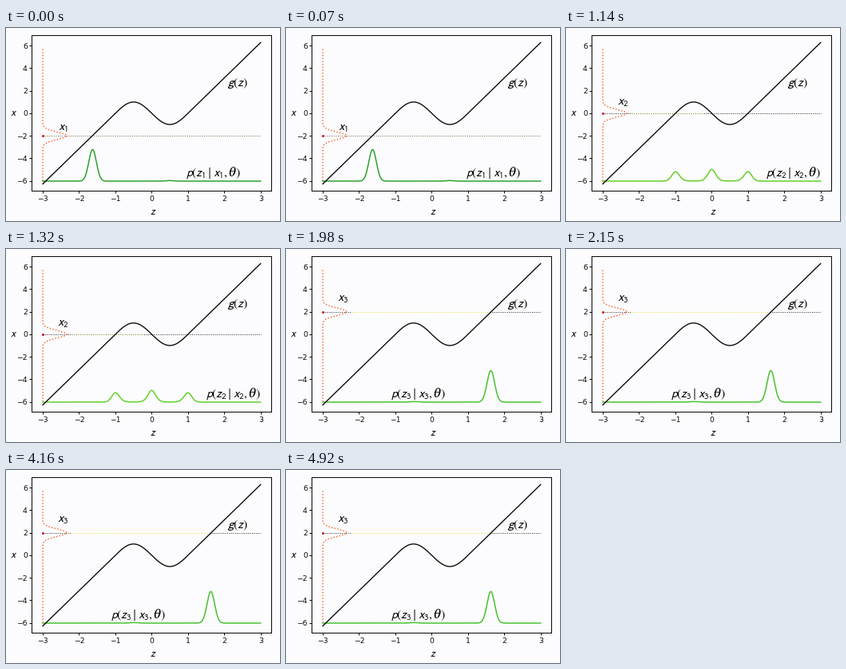
A matplotlib script for the animation above (5680 ms loop, 343 px wide and 242 px high).

```python
import numpy as np
import matplotlib.pyplot as plt
from matplotlib.animation import FuncAnimation

W, H, DPI = 343, 242, 72
LOOP, STEP = 5680, 20
INK, PAPER = "#080808", "#fcfcfe"
NOISE = 0.33              # std of x given z
PRIOR = 1.5               # std of z
BASE, GAIN = -6.03, 0.75  # placement of the posterior curve

plt.rcParams.update({
    "font.family": "DejaVu Sans",
    "mathtext.fontset": "stixsans",
    "axes.linewidth": 1,
    "axes.edgecolor": INK,
    "lines.dash_capstyle": "butt",
})

# start (ms), observed x, x label baseline, posterior label centre,
# posterior colour, guide colour and the z range where the guide has it
SCENES = [
    (0, -2, 128.5, 260, "#2ca02c", "#6e6a4c", (-3, 3)),
    (1140, 0, 97, 285, "#62cf26", "#857a10", (-2.2, -0.2)),
    (1980, 2, 65.5, 165.5, "#46c22e", "#ece22a", (-2.2, 1.6)),
]


def g(z):
    return np.where(np.abs(z) < 1, -np.sin(np.pi * z),
                    np.pi * (z - np.sign(z)))


def bell(u, std):
    return np.exp(-0.5 * (u / std) ** 2)


def posterior(z, x):
    p = bell(x - g(z), NOISE) * bell(z, PRIOR)
    return p / (p.sum() * (z[1] - z[0]))


def label(x, y, text, size=15.5, **kw):
    """Text placed in stage pixels, measured from the top left."""
    kw = {"ha": "center", "va": "baseline", "color": INK, **kw}
    return fig.text(x / W, 1 - y / H, text, fontsize=size, **kw)


fig = plt.figure(figsize=(W / DPI, H / DPI), dpi=DPI, facecolor=PAPER)
ax = fig.add_axes([32.4 / W, 1 - 204.4 / H, 300 / W, 195 / H],
                  facecolor=PAPER)
ax.set(xlim=(-3.3, 3.3), ylim=(-6.91, 6.91),
       xticks=range(-3, 4), yticks=range(-6, 7, 2))
ax.tick_params(labelsize=9.2, length=3, width=1, pad=2.6,
               color=INK, labelcolor=INK)

z = np.linspace(-3, 3, 601)
xs = np.linspace(-6, 5.85, 400)

guide, = ax.plot([], [], color=INK, lw=0.9, ls=":")
tint, = ax.plot([], [], lw=1, ls=":")
likelihood, = ax.plot([], [], color="#fa5a1e", lw=1.4, ls=":")
density, = ax.plot([], [], lw=1.5)
ax.plot(z, g(z), color=INK, lw=1.35)
dot, = ax.plot([], [], "o", color="#cc1428", ms=3, mew=0)

label(290.5, 73, "$g(z)$")
label(184.5, 234, "$z$", 13)
label(9.7, 109.5, "$x$", 13)
x_label = label(71.5, 128, "")
p_label = label(260, 186, "")


def draw(frame):
    t = frame * STEP
    n = sum(t >= scene[0] for scene in SCENES)
    _, x, base, centre, green, shade, (a, b) = SCENES[n - 1]

    guide.set_data([-3, a, np.nan, b, 3], [x, x, np.nan, x, x])
    tint.set_data([a, b], [x, x])
    tint.set_color(shade)
    likelihood.set_data(-3 + 0.66 * bell(xs - x, NOISE), xs)
    density.set_data(z, BASE + GAIN * posterior(z, x))
    density.set_color(green)
    dot.set_data([-3], [x])

    x_label.set_text(f"$x_{n}$")
    x_label.set_y(1 - base / H)
    p_label.set_text(rf"$p(z_{n} \mid x_{n}, \mathbfit{{\theta}})$")
    p_label.set_x(centre / W)
    return guide, tint, likelihood, density, dot, x_label, p_label


anim = FuncAnimation(fig, draw, frames=LOOP // STEP, interval=STEP,
                     repeat=True, repeat_delay=0)
plt.show()
```
